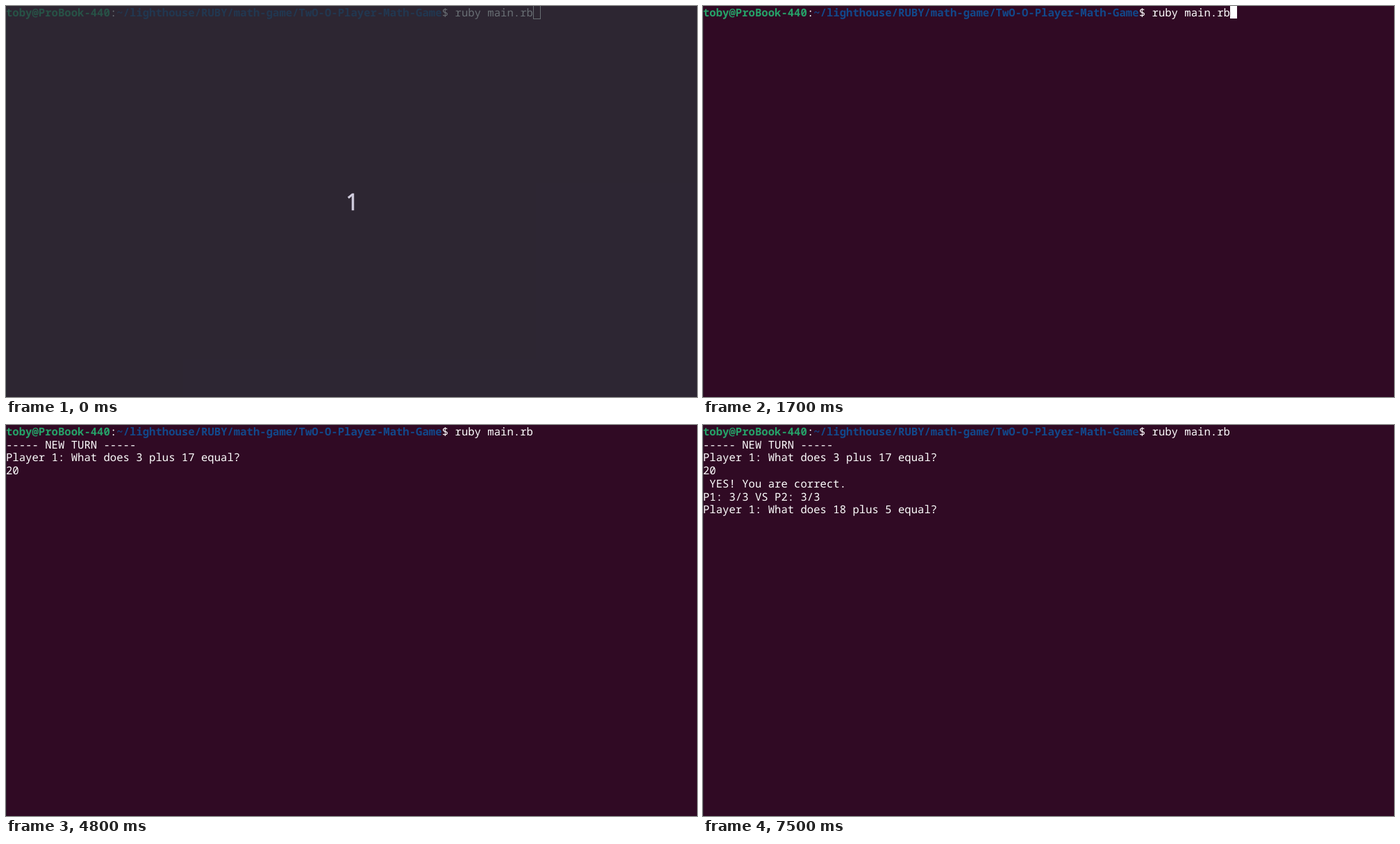
An HTML page that plays this animation: 995x563 px, repeating every 8 s.

```html
<!DOCTYPE html>
<html lang="en">
<head>
<meta charset="utf-8">
<title>Math game in a terminal</title>
<style>
  html, body { margin: 0; width: 100%; height: 100%; overflow: hidden; background: #300a24; }
  svg { display: block; width: 995px; height: 563px; }
  #term text {
    font: 500 15.617px "Noto Sans Mono", "DejaVu Sans Mono", monospace;
    fill: #fff;
    white-space: pre;
    text-rendering: geometricPrecision;
  }
  #term .user { fill: #26a269; font-weight: bold; }
  #term .path { fill: #12488b; font-weight: bold; }
  #count {
    font: 32px "Noto Sans", "Open Sans", sans-serif;
    fill: #d3cfe0;
    stroke: #d3cfe0;
    stroke-width: .7px;
  }
</style>
</head>
<body>
<svg viewBox="0 0 995 563">
  <rect id="back" width="995" height="563"/>
  <rect width="1" height="563" fill="#2c1a2c"/>
  <g id="term"></g>
  <rect id="cursor" height="19"/>
  <g id="intro">
    <rect width="995" height="563" fill="#283138" fill-opacity=".7"/>
    <text id="count" x="489.5" y="293.5">1</text>
  </g>
</svg>
<script>
const LOOP = 8000, CELL = 9.37, LINE = 18.72, BASE = 15;
const $ = id => document.getElementById(id);

const prompt = [
  ["toby@ProBook-440", "user"],
  [":", ""],
  ["~/lighthouse/RUBY/math-game/TwO-O-Player-Math-Game", "path"],
  ["$ ruby main.rb", ""]
];
const output = [
  "----- NEW TURN -----",
  "Player 1: What does 3 plus 17 equal?",
  "20",
  " YES! You are correct.",
  "P1: 3/3 VS P2: 3/3",
  "Player 1: What does 18 plus 5 equal?"
];

function addText(text, col, row, cls) {
  const el = document.createElementNS("http://www.w3.org/2000/svg", "text");
  el.setAttribute("x", col * CELL);
  el.setAttribute("y", BASE + row * LINE);
  el.setAttribute("class", cls);
  el.textContent = text;
  $("term").append(el);
  return el;
}

let col = 0;
for (const [text, cls] of prompt) {
  addText(text, col, 0, cls);
  col += text.length;
}
const END = col;
const lines = output.map((text, i) => addText(text, 0, i + 1, ""));

// start, cursor column, cursor row, cursor look, output rows, typed digits
const steps = [
  [0, END, 0, "box", 0, 0],
  [600, END, 0, "on", 0, 0],
  [1200, END, 0, "off", 0, 0],
  [1700, END, 0, "on", 0, 0],
  [1800, 0, 1, "on", 0, 0],
  [1900, 0, 3, "on", 2, 0],
  [2300, 0, 3, "off", 2, 0],
  [3000, 0, 3, "on", 2, 0],
  [3500, 0, 3, "off", 2, 0],
  [4000, 1, 3, "on", 3, 1],
  [4300, 2, 3, "on", 3, 2],
  [4800, 2, 3, "off", 3, 2],
  [5500, 2, 3, "on", 3, 2],
  [5800, 0, 7, "on", 6, 2],
  [6300, 0, 7, "off", 6, 2],
  [6900, 0, 7, "on", 6, 2],
  [7500, 0, 7, "off", 6, 2]
];

function setCursor(c, r, look) {
  const box = look === "box", inset = box ? 0.5 : 0;
  const attrs = {
    x: Math.floor(c * CELL + 0.1) + inset,
    y: Math.floor(r * LINE - 0.6) + inset,
    width: 10,
    fill: box ? "none" : "#fff",
    stroke: box ? "#fff" : "none",
    visibility: look === "off" ? "hidden" : "visible"
  };
  for (const key in attrs) $("cursor").setAttribute(key, attrs[key]);
}

function draw(t) {
  const [, c, r, look, rows, typed] = steps.findLast(step => step[0] <= t);
  $("back").setAttribute("fill", t < 600 ? "#380c26" : t < 700 ? "#340b25" : "#300a24");
  $("intro").setAttribute("visibility", t < 100 ? "visible" : "hidden");
  lines.forEach((el, i) => el.setAttribute("visibility", i < rows ? "visible" : "hidden"));
  lines[2].textContent = output[2].slice(0, typed);
  setCursor(c, r, look);
}

const start = performance.now();
function tick() {
  draw((performance.now() - start) % LOOP);
  requestAnimationFrame(tick);
}
tick();
</script>
</body>
</html>
```
